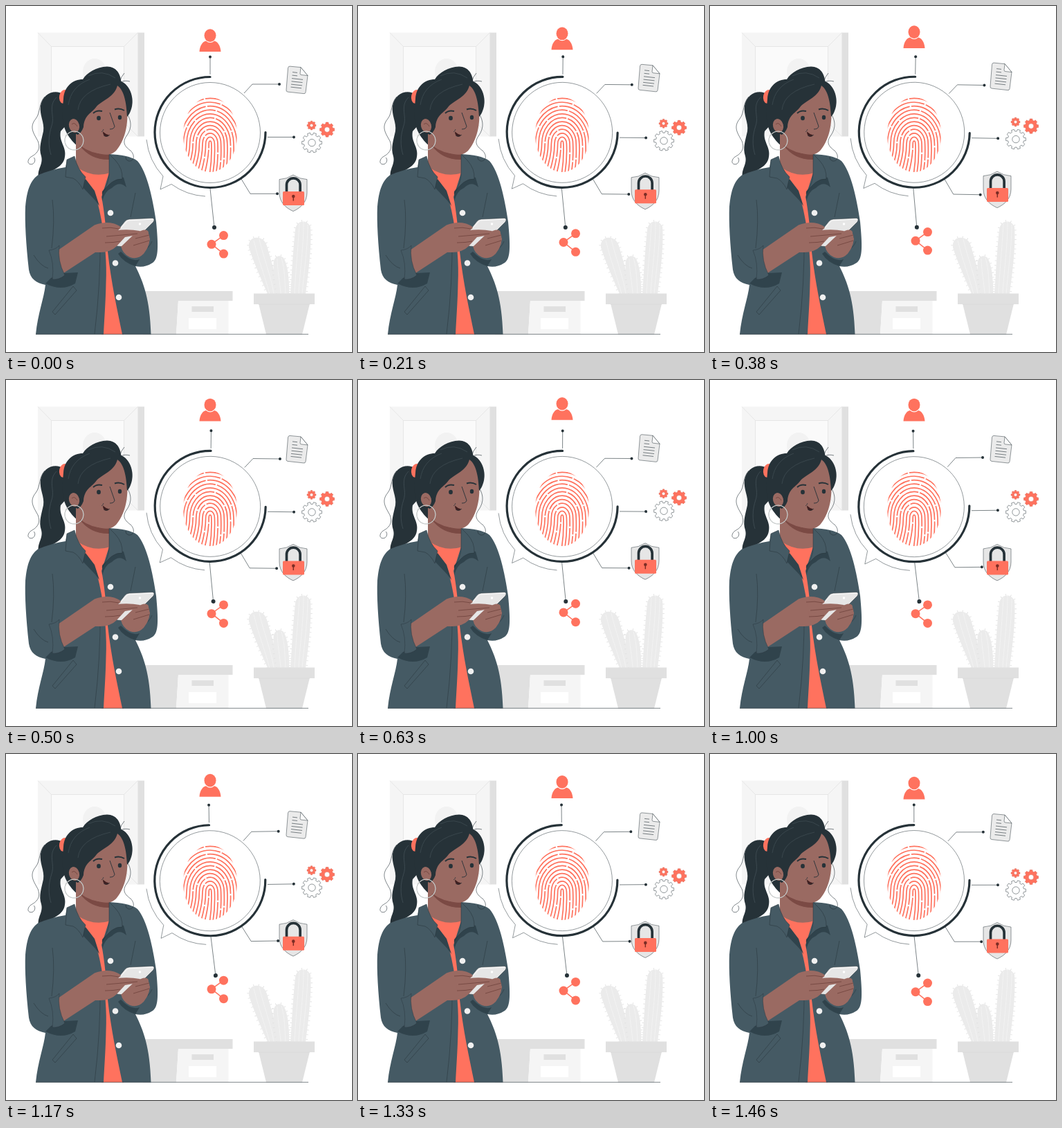
An HTML page with a canvas for the animation above (1.5 s loop, 500 px wide and 500 px high).

```html
<!DOCTYPE html>
<html lang="en">
<head>
<meta charset="utf-8">
<title>Fingerprint access</title>
<style>
html, body { margin: 0; width: 100%; height: 100%; overflow: hidden; background: #fff; }
canvas { display: block; width: 500px; height: 500px; }
</style>
</head>
<body>
<canvas id="stage" width="500" height="500"></canvas>
<script>
const ctx = document.getElementById('stage').getContext('2d');
const LOOP = 1500, STEPS = 36, TAU = Math.PI * 2;
const DARK = '#263238', RED = '#ff725e', JACKET = '#455a64', SHADE = '#30434c';
const SKIN = '#9a6a62', SKIN_DARK = '#7b4a44', GREY = '#e0e0e0', PALE = '#f5f5f5';

function fill(color, d) {
  ctx.fillStyle = color;
  ctx.fill(new Path2D(d));
}
function line(d, width = 0.6, color = DARK) {
  ctx.strokeStyle = color;
  ctx.lineWidth = width;
  ctx.stroke(new Path2D(d));
}
function shape(color, d, width = 0.6, edge = DARK) {
  fill(color, d);
  line(d, width, edge);
}
function rect(color, x, y, w, h) {
  ctx.fillStyle = color;
  ctx.fillRect(x, y, w, h);
}
function oval(color, x, y, rx, ry = rx, turn = 0) {
  ctx.fillStyle = color;
  ctx.beginPath();
  ctx.ellipse(x, y, rx, ry, turn, 0, TAU);
  ctx.fill();
}
function arc(x, y, r, from, to, width, color = DARK) {
  ctx.strokeStyle = color;
  ctx.lineWidth = width;
  ctx.beginPath();
  ctx.arc(x, y, r, from, to);
  ctx.stroke();
}

function drawPicture() {
  rect(PALE, 46, 38.5, 145, 150);
  rect(GREY, 190.5, 38.5, 9.5, 150);
  rect('#fafafa', 65.5, 58.5, 105, 110);
  oval('#f2f2f2', 128, 95, 17, 19);
  line('M65.5 58.5H170.5V168.5H65.5Z M46 38.5L65.5 58.5 M190.5 38.5L170.5 58.5 M190.5 188.5L170.5 168.5', 0.7, GREY);
}

function drawCabinet() {
  fill(GREY, 'M198 425H249L246 474.5H198Z');
  fill(PALE, 'M249 425H321.5V474.5H246Z');
  rect(GREY, 198, 412, 129.5, 14);
  rect(GREY, 268.5, 434, 31.5, 8);
  rect('#fff', 264, 451, 40, 16);
}

function cactusArm(d, ribs) {
  ctx.setLineDash([0.8, 6]);
  line(d, 5, GREY);
  ctx.setLineDash([]);
  fill('#ebebeb', d);
  line(ribs, 0.7, '#f5f5f5');
}
function drawPlant() {
  cactusArm('M378 416C368 393 356 366 351 349C350 339 356 334 364 335C373 336 376 342 378 350C384 371 391 391 393 416Z',
    'M358 339C364 365 374 390 381 416 M366 337C371 360 383 390 387 416');
  cactusArm('M392 416C389 400 386 384 386.500 372C387 362 395 358 401 364C408 375 409 396 409.500 416Z',
    'M392 365C392 380 396 400 397 416 M398 364C403 380 403 400 404 416');
  cactusArm('M411 416C413 385 415 350 418 323C420 309 435 308 440 319C442 347 437 386 433 416Z',
    'M424 314C422 350 418 390 417 416 M430 312C430 350 424 390 423 416 M436 316C436 350 430 390 428 416');
  fill(GREY, 'M365 430H439L428 474.5H376Z');
  rect(GREY, 358, 415.5, 88, 15.5);
  line('M365 431H439', 0.6, '#d4d4d4');
}

function drawPrint() {
  ctx.save();
  ctx.beginPath();
  ctx.ellipse(295, 186, 39, 54, 0, 0, TAU);
  ctx.clip();
  ctx.lineCap = 'round';
  for (let i = 0; i < 12; i++) {
    const rx = 4.6 * i + 1.8, ry = 5.6 * i + 4, droop = 7 + i;
    ctx.setLineDash([37 + i * 17 % 31, 3.5, 62 + i * 23 % 37, 3.5]);
    ctx.lineDashOffset = i * 29;
    line(`M${295 - rx - droop} 245Q${295 - rx} 220 ${295 - rx} 199A${rx} ${ry} 0 0 1 ${295 + rx} 199Q${295 + rx + 1} 224 ${295 + rx - 3} 245`, 1.7, RED);
  }
  ctx.restore();
}

function drawBubble(degrees) {
  ctx.save();
  ctx.translate(310, 197);
  ctx.rotate(degrees * Math.PI / 180);
  ctx.translate(-310, -197);
  line('M203 193A92.500 92.500 0 0 0 227 246L223 265L239 257.500A92.500 92.500 0 0 0 288 275', 0.5);
  arc(295, 183, 72.5, 0, TAU, 0.5);
  ctx.lineCap = 'round';
  arc(295, 182.5, 80, 0, Math.PI * 1.5, 3.2);
  ctx.lineCap = 'butt';
  line('M295 99V73.500 M344 126L356 113H395 M378 189.500H416 M340 250L353 271.300H392 M295 264L301 320', 0.6);
  for (const [x, y, r] of [[295, 73.5, 2], [395, 113, 2], [416, 189.5, 2], [392, 271.3, 2], [301, 320, 3]]) oval(DARK, x, y, r);
  ctx.restore();
}

function gear(x, y, r, hole, teeth, color, edge) {
  const path = new Path2D();
  for (let i = 0; i < teeth; i++) {
    const mid = i / teeth * TAU, step = TAU / teeth;
    for (const [k, scale] of [[-0.32, 0.8], [-0.22, 1], [0.22, 1], [0.32, 0.8]]) {
      const a = mid + k * step;
      path.lineTo(x + r * scale * Math.cos(a), y + r * scale * Math.sin(a));
    }
  }
  path.closePath();
  ctx.fillStyle = color;
  ctx.fill(path);
  ctx.strokeStyle = edge;
  ctx.lineWidth = 0.5;
  ctx.stroke(path);
  oval('#fff', x, y, hole);
  arc(x, y, hole, 0, TAU, 0.5, edge);
}

function drawIcons(rise) {
  ctx.save();
  ctx.translate(0, 0.6 - rise);

  oval(RED, 295, 42, 8.5, 9.3);
  fill(RED, 'M279.500 65.500C280 56 285 50.500 289 50Q295 55 301 50C305 50.500 310 56 310.500 65.500Z');

  shape('#ebebeb', 'M410 86.500L426 88L436 100L433 124Q432.500 126.500 430 126L407 123.500Q404.500 123 405 120.500L407.500 89Q408 86.500 410 86.500Z', 0.5);
  shape('#fafafa', 'M426 88L425 97Q425 99 427 99L436 100Z', 0.5);
  line('M414 95L421 95.800 M413.500 99.500L421 100.300 M413 104L429 105.800 M412.500 108.300L428.500 110 M412 112.500L428 114.300 M411.500 116.500L427 118.200', 0.6);

  gear(441.5, 172, 6.5, 2.3, 8, RED, '#d9604f');
  gear(464, 178, 10.7, 3.8, 8, RED, '#d9604f');
  gear(442, 197, 14.5, 5.2, 10, '#fff', DARK);

  shape('#e6e6e6', 'M415 243.500Q424 249.500 435 250V269C435 283 426 291 415 296C404 291 395 283 395 269V250Q406 249.500 415 243.500Z', 0.5);
  line('M405.500 269V258A9.800 9.800 0 0 1 425.100 258V269', 3.7);
  ctx.fillStyle = RED;
  ctx.beginPath();
  ctx.roundRect(400, 267.5, 31, 20, 1.5);
  ctx.fill();
  oval('#7c2d25', 415.3, 274.5, 2.3);
  line('M415.300 274.500V281', 1.5, '#7c2d25');

  line('M314.500 331L297 343.500L314.500 357.500', 1.5, RED);
  for (const [x, y] of [[314.5, 331], [297, 343.7], [314.5, 357.5]]) oval(RED, x, y, 6.5);
  ctx.restore();
}

function drawBackHair() {
  fill(DARK, 'M84 128C70 119 53 127 50 144C48 158 56 168 54 181C51 195 47 205 51 217C54 229 45 235 47 248C61 239 83 235 85 218C88 204 76 196 79 181L98 160Z');
  fill(DARK, 'M82 155C80 177 92 193 104 203V160Z');
  line('M56 131C47 141 50 154 43 163C33 175 40 184 46 195C51 207 44 214 36 218C29 224 32 230 38 228.500C42 227 43 221 40 219');
  line('M73 132C60 145 71 159 66 173C61 188 61 202 65 215', 0.6, '#4c5a61');
  oval(RED, 84, 131, 7, 10, 0.2);
}

function drawJacket() {
  fill(SKIN, 'M101 180L151 205V248L118 250L101 230Z');
  fill(SKIN_DARK, 'M106 201Q128 217 151 213L150 222Q122 223 106 201Z');
  fill(RED, 'M104 234Q126 249 151 241L170 474.500H138L128 330Z');

  fill(JACKET, 'M88 222L102 229C107 241 111 249 117 254C128 269 133 281 138 310C143 340 146 372 144.500 400C144 428 142 453 141 474.500H43C46 444 55 422 57 403C43 400 35 394 33 381C29 345 27 312 28 290C30 265 36 252 46 244.500Q66 236 86 233Z');
  fill(JACKET, 'M149 214C166 215 181 217 190 224C204 240 212 278 217 312C220 345 221 365 212 371Q200 379 187 376C199 400 208 424 209.500 474.500H168C161 440 152 400 147 355C145 325 142 295 138 276L149 241Z');

  fill(SHADE, 'M115 250L128 267L135 289L129 281L109 260Z');
  fill(SHADE, 'M139 268C147 258 160 245 170 248L174 262Q164 252 153 263Q143 267 139 282Z');
  shape(JACKET, 'M88 222L99 217Q103 236 115 247L111 265Q105 253 97 249L86 247Z', 0.5);
  shape(JACKET, 'M149 214L158 223Q169 235 168 250Q152 249 139 271Q149 256 149 241Z', 0.5);

  fill(SHADE, 'M57 401Q80 413 100 401L104 385L84 386L65 393Z');
  line('M67 280Q71 310 66 350 M180 305L187 270 M67 442L97 405L102 411L71 446Z M196 356Q207 350 211 340 M40 360Q50 376 61 379', 0.5);
  line('M136 330Q137 400 128 474', 0.5);
  for (const [x, y] of [[151, 299], [158, 371.5], [163, 421]]) oval('#f0f0f0', x, y, 4.3);
}

function drawHands() {
  fill(SHADE, 'M166 355Q181 371 193 366L187 376Q170 371 162 358Z');
  fill(SKIN, 'M75 353L128 316.500Q142 311 154 314L167 322Q181 321 193 327L196 334Q202 337 185 342L160 347Q151 356 136 356L129 356L80 388Z');
  shape(JACKET, 'M62 353Q72 352 77 346Q74 368 85 389Q77 396 67 395Q70 371 62 353Z', 0.4);
  fill(SKIN, 'M166 346Q181 329 192 326Q204 322 207 331Q210 344 199 358Q190 367 179 363Q168 358 166 346Z');
  shape('#e6e6e6', 'M160 326L172 311Q174 308.500 178 308L211 306.500Q216 307 213 312L197 328L181 344Q176 348 171 348L160 347Z', 0.5);
  line('M163 324L176 310L213 308', 0.8, '#fff');
  oval('#fff', 193.5, 315, 1.7);
  fill(SKIN, 'M139 317Q151 310 164 318Q169 322 159 324Q179 322 193 325Q198 328 189 331L172 334L160 347L145 350Z');
  fill(SKIN, 'M186 329Q204 319 206 327Q207 332 190 335Q208 330 208 337Q207 342 189 345Q205 340 205 348Q198 360 180 361L166 348Z');
  line('M139 321Q151 319 163 322 M145 333L190 329 M143 342Q156 342 165 340 M187 336L207 331 M184 346L207 339', 0.6, '#60342f');
}

function drawHead() {
  fill(SKIN, 'M106 152L130 121L160 113Q173 118 174 139C178 164 174 191 160 208C150 220 133 214 117 206Q106 199 102 188Z');
  fill(DARK, 'M83 134C84 116 97 106 111 106C117 96 131 88 146 87.500C160 88 165 98 166.500 109C179 114 185 132 182 145C180 154 177 158 175 160C174 140 171 122 161 115C157 131 140 136 131 145C124 155 113 157 112 175Q109 183 104 186C93 182 82 174 81 157Z');
  line('M164 111Q166 102 171 97 M166 110Q171 107 179 109 M175 156C184 170 179 181 174 188C167 198 173 204 180 209C187 216 185 225 177 224Q172 222 173 218');
  line('M90 143Q94 116 121 106 M104 150Q107 123 151 113 M119 101Q139 91 158 104', 0.5, '#4c5a61');

  oval(SKIN, 98.5, 173, 7.5, 10, -0.25);
  line('M95 171Q99 167 103 174', 0.6, '#60342f');
  arc(98.5, 194.5, 13.5, 0, TAU, 1.1, '#a3aaa9');
  arc(98.5, 194.5, 13.5, 0, TAU, 0.6, '#eee');

  line('M126 155Q131 150 139 152 M157 149.500Q164 147 171 151', 2);
  oval(DARK, 134, 162, 2.9, 3.3);
  oval(DARK, 164.5, 161, 2.7, 3.2);
  line('M150 154L157 174Q156 178 150 178', 0.9);
  fill('#401f20', 'M140 181.500Q144 185.500 149 186.500Q147 190 143 188.500Q140 186 140 181.500Z');
  line('M138 182Q140 181 141 178 M141 187Q146 190 150 186', 0.7);
}

// Triangle wave between -1 and 1, starting at 0 and rising
const sway = p => p < 0.25 ? p * 4 : p < 0.75 ? 2 - p * 4 : p * 4 - 4;

function draw(now) {
  const phase = Math.floor((now % LOOP) / LOOP * STEPS + 0.1) / STEPS;
  rect('#fff', 0, 0, 500, 500);
  drawPicture();
  drawCabinet();
  drawPlant();
  drawBubble(sway(phase));
  drawPrint();
  drawIcons(10 * (1 - Math.abs(1 - 2 * phase)));
  drawBackHair();
  drawJacket();
  drawHands();
  drawHead();
  line('M43 474.300H437', 0.6);
  requestAnimationFrame(draw);
}
requestAnimationFrame(draw);
</script>
</body>
</html>
```
